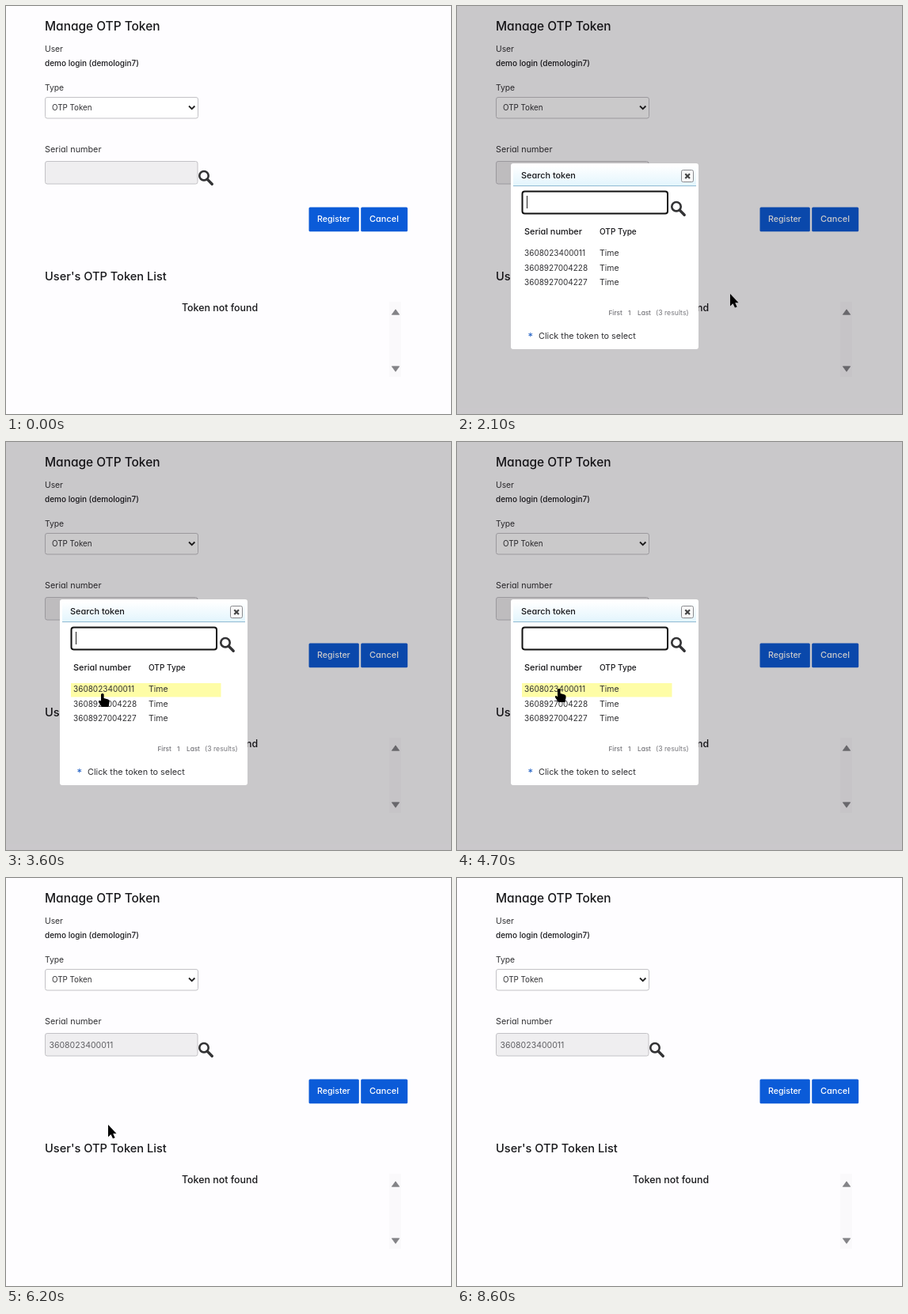
Animation, 562 px wide and 516 px high, one loop 8.7 s. Source, as an HTML page:

```html
<!DOCTYPE html>
<html lang="en">
<head>
<meta charset="utf-8">
<title>Manage OTP Token</title>
<style>
  html, body { margin: 0; width: 100%; height: 100%; overflow: hidden; background: #fefdff; }
  svg { display: block; width: 100%; height: 100%; }
  text { font-family: Inter, "Open Sans", sans-serif; font-feature-settings: "cv11"; fill: #303033; white-space: pre; }
  .medium { font-weight: 500; fill: #18181b; }
  .button { fill: #0b5bd8; }
  .on-button { font-weight: 500; fill: #fff; }
  .field { stroke: #c3c2c6; }
  .serial { font-size: 10px; }
  .pager text { fill: #77777c; font-size: 8.2px; }
  .pager .medium { fill: #707075; }
  .row rect { fill: #fefda6; visibility: hidden; }
  .row.hover rect { visibility: visible; }
</style>
</head>
<body>
<svg viewBox="0 0 562 516">
  <defs>
    <g id="magnifier" fill="none" stroke="#333335">
      <circle cx="7" cy="6.7" r="5.7" stroke-width="2.6"/>
      <path d="M11.3 11.2L17.2 17.2" stroke-width="3.4" stroke-linecap="round"/>
    </g>
    <linearGradient id="header" x2="0" y2="1">
      <stop stop-color="#fff"/>
      <stop offset="1" stop-color="#e3f5fd"/>
    </linearGradient>
  </defs>

  <rect width="562" height="516" fill="#fefdff"/>
  <text class="medium" x="49" y="31" font-size="15.45">Manage OTP Token</text>
  <text x="49" y="58" font-size="10.3">User</text>
  <text class="medium" x="49" y="76" font-size="10">demo login (demologin7)</text>
  <text x="49" y="107" font-size="10.3">Type</text>
  <rect class="field" x="49.5" y="115.5" width="193" height="26.5" rx="2.5" fill="#fff"/>
  <text x="58" y="132" font-size="9.8">OTP Token</text>
  <path d="M231 126.5L234.7 130.2L238.4 126.5" fill="none" stroke="#222" stroke-width="1.8"/>
  <text x="49" y="184.5" font-size="10.8">Serial number</text>
  <rect class="field" x="49.5" y="196.5" width="192.5" height="28.5" rx="2.5" fill="#efeef0"/>
  <text id="chosen" x="54.5" y="214.5" font-size="10.5" style="fill:#606064">3608023400011</text>
  <use href="#magnifier" x="243" y="208"/>

  <rect class="button" x="382.5" y="254.5" width="63.3" height="30.7" rx="1.5"/>
  <text class="on-button" x="393" y="273" font-size="10.6">Register</text>
  <rect class="button" x="448.2" y="254.5" width="59" height="30.7" rx="1.5"/>
  <text class="on-button" x="459" y="273" font-size="11">Cancel</text>

  <text class="medium" x="49" y="347" font-size="14.6">User's OTP Token List</text>
  <text class="medium" x="222" y="385.5" font-size="12.4">Token not found</text>
  <rect x="484" y="374" width="15" height="95" fill="#faf9fb"/>
  <path d="M487.3 390.3L492 383.8L496.7 390.3ZM487.3 455.8L492 462.3L496.7 455.8Z" fill="#838387" stroke="#838387" stroke-width=".8" stroke-linejoin="round"/>

  <g id="dialog">
    <rect width="562" height="516" fill="#080008" fill-opacity=".21"/>
    <rect x="68" y="199" width="237" height="235" rx="3" fill="#fff"/>
    <rect x="71" y="202" width="231" height="25" fill="url(#header)"/>
    <path d="M71 227.5H302" stroke="#8fb9d2"/>
    <text class="medium" x="81" y="217.5" font-size="10.9">Search token</text>
    <rect x="283.5" y="207.5" width="15" height="15" rx="2" fill="#f8f8f8" stroke="#8a8a8e"/>
    <path d="M288.3 212.3L294 218M294 212.3L288.3 218" stroke="#444" stroke-width="2.2"/>

    <rect id="search" x="82.5" y="234.5" width="183.5" height="28" rx="3" fill="#fff"/>
    <path id="caret" d="M88.5 240V256" stroke="#222"/>
    <use href="#magnifier" x="270" y="247"/>

    <text class="medium" x="85" y="289" font-size="10.9">Serial number</text>
    <text class="medium" x="180" y="289" font-size="10">OTP Type</text>
    <g id="rows"></g>

    <g class="pager">
      <text class="medium" x="191.5" y="391">First</text>
      <text class="medium" x="216" y="391">1</text>
      <text class="medium" x="228" y="391">Last</text>
      <text x="251" y="391" style="font-size:8.7px">(3 results)</text>
    </g>
    <text x="89.5" y="423" font-size="13" style="fill:#1f5fc4">*</text>
    <text x="103" y="421" font-size="10.85">Click the token to select</text>
  </g>

  <g id="cursor">
    <path id="arrow" paint-order="stroke" d="M0 0V15.5L3.5 12.3L6 17.6L8.6 16.4L6.2 11.2H10.5Z"/>
    <path id="hand" d="M-2 1Q0 -1 1.6 1V6L7 7.5Q9 8.2 8.6 11L7.4 17H-1L-5 11Q-5.6 8.8 -3.6 9L-2 10.3Z"/>
  </g>
</svg>
<script>
  const LOOP = 8700, TICK = 100;
  const $ = id => document.getElementById(id);
  const show = (el, on) => { el.style.visibility = on ? 'inherit' : 'hidden'; };
  const within = (t, from, to) => t >= from && t < to;

  const ROW_TOPS = [305, 324, 342.5];
  const ROW_HEIGHT = 17.5;
  $('rows').innerHTML = ['3608023400011', '3608927004228', '3608927004227'].map((serial, i) => `
    <g class="row">
      <rect x="82" y="${ROW_TOPS[i]}" width="189.5" height="${ROW_HEIGHT}"/>
      <text class="serial" x="85" y="${ROW_TOPS[i] + 10.5}">${serial}</text>
      <text x="180" y="${ROW_TOPS[i] + 10.5}" font-size="10.5">Time</text>
    </g>`).join('');
  const rows = [...document.querySelectorAll('.row')];

  // Pointer stops: time, x, y. Travel between stops is eased.
  const stops = [
    [200, 461, 465], [1000, 252, 213], [1100, 253, 213], [2000, 253, 213],
    [2100, 345, 364], [2300, 398, 470], [2500, 405, 491], [2600, 401, 487],
    [2900, 401, 487], [3600, 122, 318], [3700, 120, 318], [3800, 120, 318],
    [3900, 142, 314], [4000, 129, 312], [7400, 129, 312], [8100, 431, 517]
  ];
  const caretOn = [[2100, 2600], [3200, 3700], [4200, 4700], [5200, 5700]];

  function pointerAt(t) {
    const next = stops.findIndex(stop => stop[0] > t);
    if (next < 1) return null;
    const [t0, x0, y0] = stops[next - 1], [t1, x1, y1] = stops[next];
    const p = (t - t0) / (t1 - t0), k = p * p * (3 - 2 * p);
    return { x: x0 + (x1 - x0) * k, y: y0 + (y1 - y0) * k };
  }

  function render(t) {
    const open = within(t, 2100, 6200);
    const pointer = pointerAt(t);
    const hovered = open && pointer && pointer.x > 82 && pointer.x < 271
      ? ROW_TOPS.findIndex(top => within(pointer.y, top, top + ROW_HEIGHT)) : -1;

    show($('dialog'), open);
    show($('chosen'), t >= 6200);
    show($('caret'), caretOn.some(([from, to]) => within(t, from, to)));
    const focused = t < 6100;
    $('search').setAttribute('stroke', focused ? '#111' : '#b9b9bd');
    $('search').setAttribute('stroke-width', focused ? 2 : 1);
    rows.forEach((row, i) => row.classList.toggle('hover', i === hovered));

    show($('cursor'), pointer);
    if (!pointer) return;
    $('cursor').setAttribute('transform', `translate(${Math.round(pointer.x)} ${Math.round(pointer.y)})`);
    show($('arrow'), hovered < 0);
    show($('hand'), hovered >= 0);
    $('arrow').setAttribute('stroke', within(t, 900, 2100) ? '#fff' : 'none');
  }

  const start = performance.now();
  function loop() {
    const elapsed = (performance.now() - start) % LOOP;
    render(Math.floor(elapsed / TICK) * TICK);
    requestAnimationFrame(loop);
  }
  loop();
</script>
</body>
</html>
```
